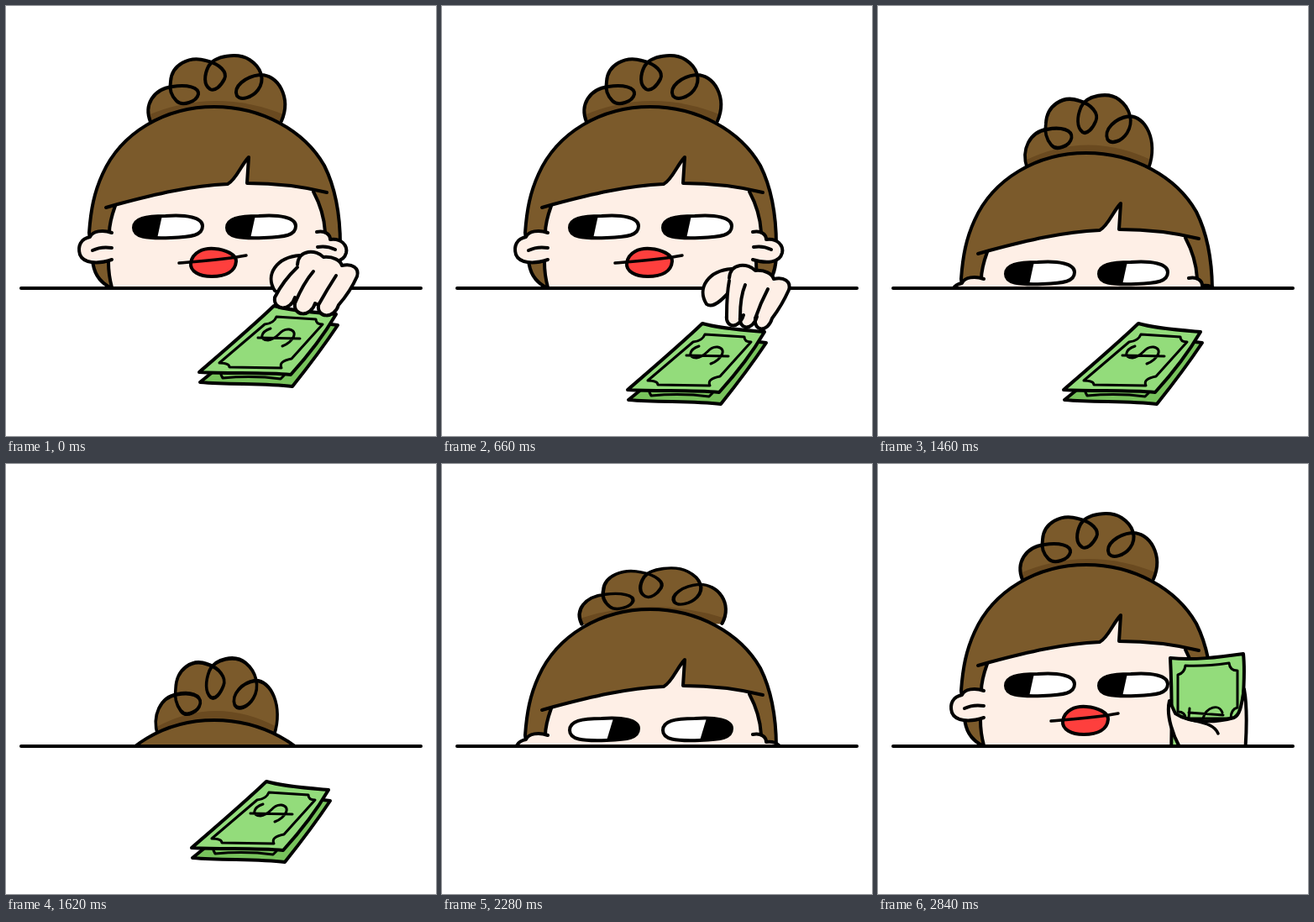
Recreate the animation shown at these times as an HTML page with a canvas. Size 512x512 px, loop 2.92 s.

```html
<!DOCTYPE html>
<html lang="en">
<head>
<meta charset="utf-8">
<title>Peek and pay</title>
<style>
html, body { margin: 0; width: 100%; height: 100%; overflow: hidden; background: #fff; }
canvas { display: block; width: 512px; height: 512px; }
</style>
</head>
<body>
<canvas id="stage"></canvas>
<script>
const LOOP = 2920, EDGE = 336;
const HAIR = '#7b5a2b', SHADE = '#6a4a20', SKIN = '#feefe6', LIP = '#fe3f3d';
const BILL = '#93dc7b', BACK = '#78c35c', INK = '#000';

const canvas = document.getElementById('stage');
const ctx = canvas.getContext('2d');
const ratio = window.devicePixelRatio || 1;
canvas.width = canvas.height = 512 * ratio;

const P = d => new Path2D(d);

const head = {
  dome: P('M124 335C110 328 104 316 103 302L99 270C101 242 105 222 115 200C137 151 189 120 248 120C304 120 355 148 379 190C389 210 398 240 398 285C399 310 395 327 382 335Z'),
  face: P('M130 237C175 226 220 214 266 212C274 206 280 190 289 180L287 211C315 211 342 213 366 220C374 236 379 254 379 272L375 300L378 337H126L122 300C122 276 124 255 130 237Z'),
  sides: P('M130 238C125 252 123 262 123 270M122 305Q122 320 126 335M366 221C374 236 379 252 380 269M374 304Q374 320 378 335'),
  fringe: P('M119 240L133 236C178 224 220 214 264 212C274 207 280 189 289 180L287 211C320 211 350 214 382 222'),
  earL: P('M126 270C115 266 103 268 100 275C89 277 85 286 88 296C92 306 108 308 126 302'),
  earR: P('M370 269C380 267 386 272 386 278C399 276 407 285 405 294C402 306 386 307 370 302'),
  creases: P('M103 291Q113 286 126 288M371 287Q382 285 392 290'),
  eye: P('M152 264C152 253 166 250 190 250C215 248 234 252 234 262C234 273 222 275 196 276C166 277 152 275 152 264Z'),
  lookLeft: P('M140 240H188L178 286H140Z'),
  lookRight: P('M207 240H245V286H193Z'),
  lips: P('M220 306C222 293 235 288 248 289C262 290 274 296 274 304C273 316 262 322 245 322C230 322 219 316 220 306Z'),
  mouth: P('M206 306C230 304 260 302 286 297')
};

const bun = {
  outline: P('M172 138C164 118 175 99 198 96C216 93 230 97 229 105C227 114 210 120 203 113C197 107 194 100 196 90C197 70 218 59 238 65C255 69 264 79 260 87C256 95 249 102 243 99C235 94 236 82 241 72C248 59 276 55 290 64C304 73 309 88 300 100C293 109 280 113 275 107C270 96 285 84 302 82C324 81 340 109 328 137'),
  shade: P('M160 134Q250 92 342 134V145H160Z')
};

const cash = {
  back: P('M312 392L386 401C372 422 352 449 332 474C300 470 260 472 222 469L238 456Z'),
  backFrame: P('M247 460L249 464C272 462 295 462 318 465L322 461'),
  front: P('M310 378C330 384 360 386 384 388C370 412 350 438 330 460C296 457 260 459 221 457C250 432 285 402 310 378Z'),
  frame: P('M313 391L360 394Q360 400 368 400L331 441Q315 444 319 452L257 451Q257 446 245 446L299 400Q310 399 313 391Z'),
  sign: P('M291 416L341 417M306 405C294 409 292 419 303 419C315 418 317 405 328 406C340 408 333 421 320 426')
};

const note = {
  sheet: P('M348 231C376 234 406 230 435 226C438 254 434 280 433 306L433 350H349C350 310 350 270 348 231Z'),
  frame: P('M366 240Q390 241 418 237Q419 246 428 246V290Q420 292 420 303H366Q366 295 357 295V251Q365 249 366 240Z'),
  sign: P('M371 291L370 302M370 296L411 299M387 303C391 289 406 285 410 296'),
  palm: P('M347 282C343 298 350 324 364 345H437C439 318 440 290 436 268C433 284 432 298 424 302C402 308 372 309 354 297Z'),
  thumb: P('M362 301C376 308 399 306 405 321')
};

// Each row holds from its time until the next: time, drop, bun height, bun width
const headKeys = [
  [0, 0, 1, 1], [1300, 3, 1.02, 0.99], [1380, 16, 1.06, 0.96], [1460, 55, 1.1, 0.93],
  [1540, 118, 1.14, 0.9], [1620, 185, 1.16, 0.89], [1700, 235, 1.16, 0.89], [1780, 400, 1, 1],
  [2120, 185, 0.85, 1.06], [2200, 115, 0.84, 1.08], [2280, 53, 0.85, 1.07],
  [2360, 12, 0.95, 1.03], [2440, -1, 1.02, 0.99], [2520, 0, 1, 1]
];
// time, x, y, open, behind the table
const handKeys = [
  [0, 0, 0, 0, 0], [250, -3, 7, 0, 0], [330, -7, 16, 0, 0], [410, -9, 21, 0, 0],
  [660, -5, 16, 1, 0], [740, 0, 4, 1, 0], [820, 6, -8, 1, 0], [900, 11, -16, 1, 1],
  [980, 14, -8, 1, 1], [1060, 15, 10, 1, 1], [1140, 15, 27, 1, 1]
];
// time, x, y, tilt, gap to the rear note
const noteKeys = [[2600, 0, 69, 0, 1], [2680, 3, 24, 0.04, 0.6], [2760, 2, -5, 0.03, 0], [2840, 0, 0, 0, 0]];

function at(keys, t) {
  let row = keys[0];
  for (const k of keys) if (t >= k[0]) row = k;
  return row;
}

function shape(path, fill, line = 4) {
  if (fill) { ctx.fillStyle = fill; ctx.fill(path); }
  if (line) { ctx.lineWidth = line; ctx.strokeStyle = INK; ctx.stroke(path); }
}

function group(draw) {
  ctx.save();
  draw();
  ctx.restore();
}

function behindTable(draw) {
  group(() => {
    ctx.beginPath();
    ctx.rect(0, 0, 512, EDGE);
    ctx.clip();
    draw();
  });
}

function drawBun(sx, sy) {
  group(() => {
    ctx.translate(250.5, 138);
    ctx.scale(sx, sy);
    ctx.translate(-250.5, -138);
    shape(bun.outline, HAIR, 0);
    group(() => {
      ctx.clip(bun.outline);
      shape(bun.shade, SHADE, 0);
    });
    shape(bun.outline);
  });
}

function drawEye(x, right) {
  group(() => {
    ctx.translate(x, 0);
    shape(head.eye, '#fff', 0);
    group(() => {
      ctx.clip(head.eye);
      shape(right ? head.lookRight : head.lookLeft, INK, 0);
    });
    shape(head.eye);
  });
}

function drawHead(t) {
  const [, drop, sy, sx] = at(headKeys, t);
  const right = t >= 2120 && t < 2440;
  group(() => {
    ctx.translate(0, drop);
    drawBun(sx, sy);
    shape(head.dome, HAIR);
    shape(head.face, SKIN, 0);
    shape(head.sides);
    shape(head.earL, SKIN);
    shape(head.earR, SKIN);
    shape(head.creases);
    shape(head.fringe);
    drawEye(0, right);
    drawEye(111, right);
    shape(head.lips, LIP);
    shape(head.mouth, null, 3.5);
  });
}

function drawHand(x, y, open) {
  const r = 12 - 2 * open;
  const tips = [[384 + 4 * open, 356], [356 + 14 * open, 354], [332 + 22 * open, 347 + 5 * open]];
  const lobe = P('M350 297C322 299 308 320 320 339C328 345 342 331 352 318Z');
  const fist = new Path2D();
  fist.moveTo(347, 308);
  fist.bezierCurveTo(348, 289, 370, 290, 378, 299);
  fist.bezierCurveTo(390, 298, 398, 303, 400, 309);
  fist.bezierCurveTo(412, 306, 421, 312, 418, 322);
  fist.quadraticCurveTo(410, 340, tips[0][0] + r, tips[0][1]);
  for (const [tx, ty] of tips) {
    fist.lineTo(tx + r, ty);
    fist.bezierCurveTo(tx + r - 5, ty + 17, tx - r - 2, ty + 16, tx - r, ty);
  }
  fist.quadraticCurveTo(330 + 14 * open, 327, 347, 311);
  const gaps = new Path2D();
  gaps.moveTo(366, 316);
  gaps.quadraticCurveTo(354 + 6 * open, 330, tips[1][0] - r, tips[1][1]);
  gaps.moveTo(393, 321);
  gaps.quadraticCurveTo(382 + 2 * open, 338, tips[0][0] - r, tips[0][1]);
  group(() => {
    ctx.translate(x, y);
    shape(lobe, SKIN);
    shape(fist, SKIN);
    shape(gaps);
  });
}

function drawCash(x, y) {
  group(() => {
    ctx.translate(x, y);
    shape(cash.back, BACK);
    shape(cash.backFrame, null, 3);
    shape(cash.front, BILL);
    shape(cash.frame, null, 3);
    shape(cash.sign, null, 3);
  });
}

function drawNote(t) {
  const [, x, y, tilt, gap] = at(noteKeys, t);
  group(() => {
    ctx.translate(392 + x, EDGE + y);
    ctx.rotate(tilt);
    ctx.translate(-392, -EDGE);
    if (gap) group(() => {
      ctx.translate(6 * gap, -11 * gap);
      shape(note.sheet, BACK);
    });
    shape(note.sheet, BILL);
    shape(note.frame, null, 3);
    shape(note.sign, null, 3);
    shape(note.palm, SKIN);
    shape(note.thumb, null, 3.5);
  });
}

function render(t) {
  ctx.setTransform(ratio, 0, 0, ratio, 0, 0);
  ctx.fillStyle = '#fff';
  ctx.fillRect(0, 0, 512, 512);
  ctx.lineCap = ctx.lineJoin = 'round';

  const [, hx, hy, open, hidden] = at(handKeys, t);
  const handOut = t < 1220;
  behindTable(() => {
    drawHead(t);
    if (handOut && hidden) drawHand(hx, hy, open);
    if (t >= 2600) drawNote(t);
  });
  shape(P(`M18 ${EDGE}H494`));
  if (t < 1950) {
    const held = t < 660;
    drawCash(held ? hx + 9 : 0, held ? hy - 21 : 0);
  }
  if (handOut && !hidden) drawHand(hx, hy, open);
}

function tick(now) {
  render(now % LOOP);
  requestAnimationFrame(tick);
}
render(0);
requestAnimationFrame(tick);
</script>
</body>
</html>
```
